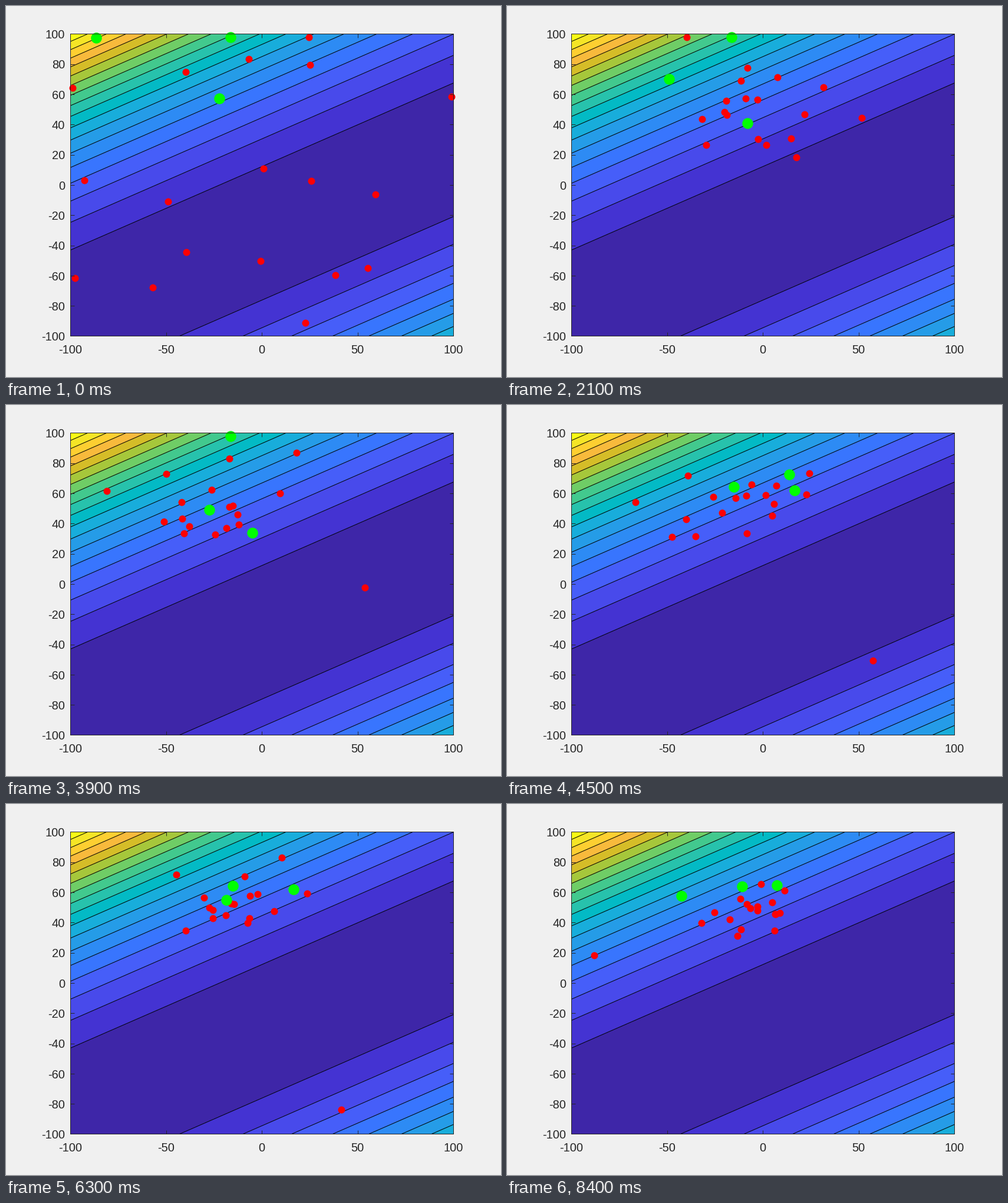
A matplotlib script that plays this animation: 840x630 px, repeating every 8700 ms.

```python
import numpy as np
import matplotlib.pyplot as plt
from matplotlib.animation import FuncAnimation
from matplotlib.patches import Rectangle

W, H, DPI = 840, 630, 100
STEPS, STEP_MS = 29, 300
PT = 72 / DPI                       # one pixel in points
LEFT, RIGHT, TOP, BOTTOM = 109.4, 759.4, 47.4, 560.4
INK = "#262626"
BANDS = """#3e26a8 #4433d2 #484aeb #465ef9 #3875fe #2d8bf4 #259ce7 #18addb
#03bac5 #27c2ac #42c98e #6fcd66 #a6c73b #d5bd28 #f8ba3c #fdcf31
#f5e526 #f9fb15""".split()

# Each leader holds a place (x, y) from the given step until the next one
LEADERS = [
    [(0, -86.7, 97.5), (6, -49, 70.3), (10, -27.5, 49), (15, -15.2, 64.4),
     (25, -11, 63.8)],
    [(0, -16.5, 98), (15, 13.6, 72.5), (19, -18.5, 55), (25, -42.5, 57.5)],
    [(0, -22.4, 57.4), (7, -8, 41), (10, -5.2, 34), (15, 16.5, 62),
     (25, 7.4, 64.6)],
]
PACK = 18
HOME = np.array([-9, 53])

plt.rcParams["font.family"] = "Liberation Sans"
fig = plt.figure(figsize=(W / DPI, H / DPI), dpi=DPI, facecolor="#f0f0f0")
ax = fig.add_axes([0, 0, 1, 1])
ax.set_xlim(0, W)
ax.set_ylim(H, 0)
ax.axis("off")


def px(v):
    return LEFT + (v + 100) / 200 * (RIGHT - LEFT)


def py(v):
    return BOTTOM - (v + 100) / 200 * (BOTTOM - TOP)


def draw_surface():
    """Filled contours of a slanted parabolic valley."""
    v = np.linspace(-100, 100, 401)
    x, y = np.meshgrid(v, v)
    z = (y - 0.553 * x + 32) ** 2
    levels = 1955 * np.arange(len(BANDS) + 1)
    ax.contourf(px(x), py(y), z, levels=levels, colors=BANDS)
    ax.contour(px(x), py(y), z, levels=levels[1:-1], colors="black",
               linewidths=PT)


def line(x, y):
    ax.plot(x, y, color=INK, lw=PT, solid_capstyle="butt", zorder=6)


def label(x, y, v, align):
    ax.text(x, y, str(v), size=20 * PT, color=INK, ha=align, va="baseline")


def draw_frame():
    ax.add_patch(Rectangle((LEFT, TOP), RIGHT - LEFT, BOTTOM - TOP, fill=False,
                           ec=INK, lw=PT, zorder=6))
    tick = 6.5
    for v in range(-100, 101, 50):
        x = px(v)
        line([x, x], [BOTTOM, BOTTOM - tick])
        line([x, x], [TOP, TOP + tick])
        label(x - 0.5, 590, v, "center")
    for v in range(-100, 101, 20):
        y = py(v)
        line([LEFT, LEFT + tick], [y, y])
        line([RIGHT, RIGHT - tick], [y, y])
        label(100, y + 7.8, v, "right")


def leaders_at(n):
    return np.array([[p[1:] for p in path if p[0] <= n][-1]
                     for path in LEADERS])


def roam():
    """Scattered pack that hops around its home in a shrinking cloud."""
    rng = np.random.default_rng(7)
    pack = rng.uniform(-100, 100, (PACK, 2))
    walk = [pack]
    for n in range(1, STEPS):
        u = n / (STEPS - 1)
        spread = np.array([30 - 16 * u, 24 - 17 * u])
        pack = HOME + 0.3 * (pack - HOME) + rng.normal(0, spread, pack.shape)
        pack[n % PACK] = rng.uniform(-100, 100, 2)      # one strays off
        pack = np.clip(pack, -98, 98)
        walk.append(pack)
    return walk


def dots(diameter, color, z):
    return ax.scatter([], [], s=(diameter * PT) ** 2, c=color, linewidths=0,
                      zorder=z)


def place(marks, points):
    marks.set_offsets(np.column_stack([px(points[:, 0]), py(points[:, 1])]))


draw_surface()
draw_frame()
reds = dots(12, "#ff0000", 4)
greens = dots(18.5, "#00ff00", 5)
WALK = roam()


def update(n):
    place(reds, WALK[n])
    place(greens, leaders_at(n))
    return reds, greens


anim = FuncAnimation(fig, update, frames=STEPS, interval=STEP_MS, repeat=True,
                     repeat_delay=0)
plt.show()
```
